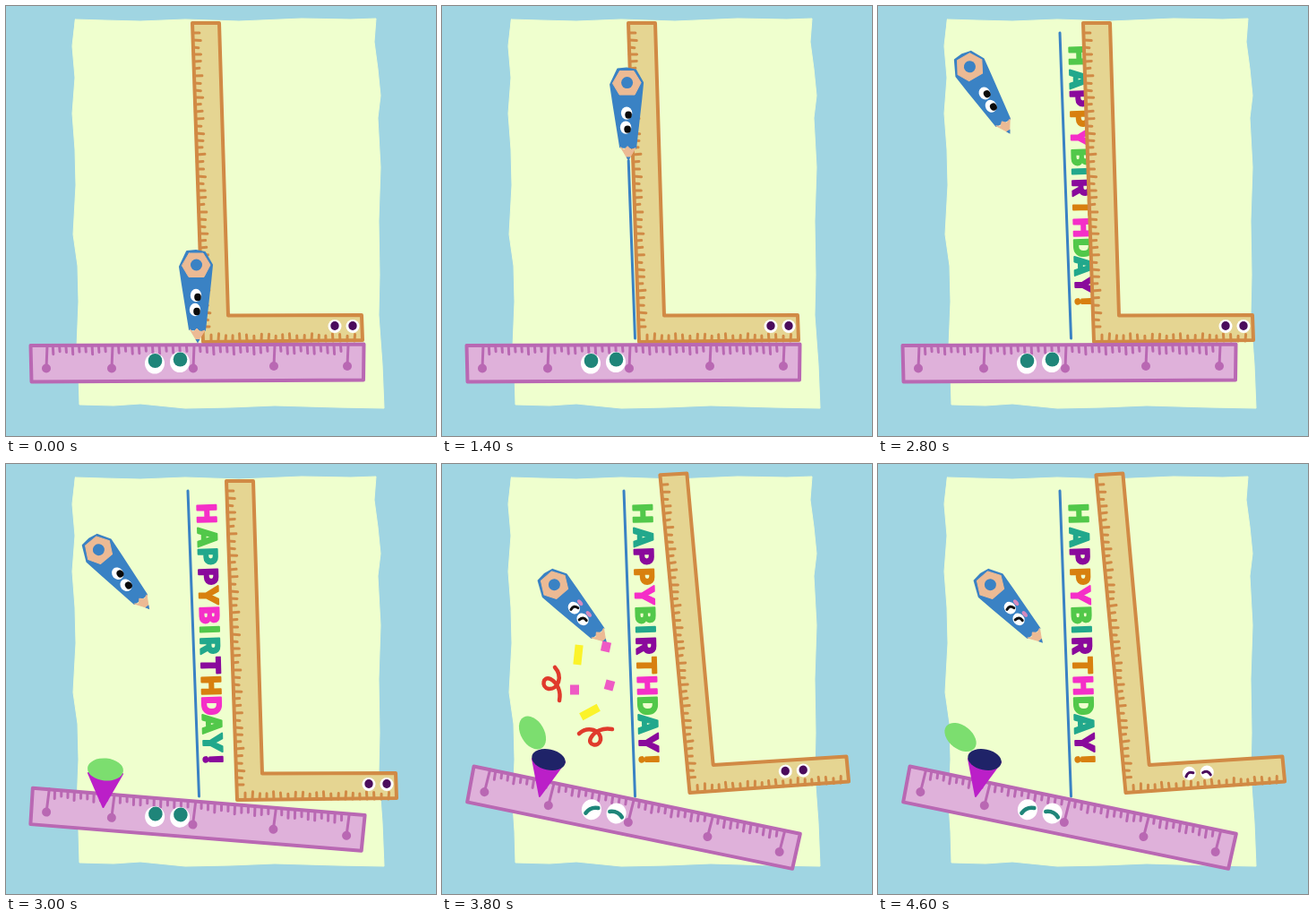
An HTML page with a canvas for the animation above (4.8 s loop, 480 by 480 pixels).

```html
<!DOCTYPE html>
<html lang="en">
<head>
<meta charset="utf-8">
<title>Happy Birthday</title>
<style>
html, body { margin: 0; width: 100%; height: 100%; overflow: hidden; background: #a0d5e2; }
canvas { display: block; width: 480px; height: 480px; }
</style>
</head>
<body>
<canvas id="stage" width="480" height="480"></canvas>
<script>
const ctx = document.getElementById('stage').getContext('2d');
const STEP = 200, STEPS = 24;
const BLUE = '#3a82c4', PEACH = '#ecba94', PURPLE = '#4b0c5c', TEAL = '#1f8579';
const INKS = ['#f52fc8', '#52c84a', '#22a88c', '#8a0a9c', '#d8800f'];

// Keys are [step, ...values]; values are linear in between.
function track(keys, n) {
  if (n <= keys[0][0]) return keys[0].slice(1);
  for (let i = 1; i < keys.length; i++) {
    const a = keys[i - 1], b = keys[i];
    if (n <= b[0]) {
      const k = (n - a[0]) / (b[0] - a[0]);
      return a.slice(1).map((v, j) => v + (b[j + 1] - v) * k);
    }
  }
  return keys[keys.length - 1].slice(1);
}

const PENCIL_LIFT = [[0, 0], [1, -18], [2, -42], [3, -72], [4, -104.5], [5, -132], [6, -169], [11, -341], [12, -370]];
const PENCIL_FLY = [[13, 112, -35, -15], [14, 102, 68, -30], [15, 103, 96, -39.5], [17, 130, 117, -22.5], [19, 125, 135, -41]];
const SQUARE = [[12, 220, 375, 0], [13, 228, 375, 0], [14, 241, 375, 0], [15, 258, 375, 0],
  [16, 261, 368, 0], [17, 268, 360.5, -0.3], [18, 276, 363, -2.4], [19, 276.5, 367, -3.4]];
const SQUARE_EYES = [[17, 0], [19, -39], [22, -75]];
const RULER = [[14, 398.5, 0], [15, 397, 4.9], [16, 395, 11.9]];
const LID = [[17, 101, 299, 70], [19, 101, 300, 60], [21, 92, 305, 38]];
const DRIFT = [[19, 0, 0], [20, 12, 12], [21, 20, 38], [22, 28, 70]];
// kind, then x, y, angle at the burst and 400 ms later
const CONFETTI = [
  ['strip', 98, 232, -15, 152, 213, 6],
  ['strip', 135, 288, 42, 165, 277, 62],
  ['bit', 124, 212, 35, 183, 204, 12],
  ['bit', 143.5, 251, 35, 187, 247, 15],
  ['bit', 110, 270, 20, 148, 252, 0],
  ['curl', 88, 271, 64, 126, 245, 90],
  ['curl', 147, 306, -15, 171, 301, 0]
];
const LETTERS = 'HAPPYBIRTHDAY!';
const SPOTS = [55.5, 82, 103.5, 126, 147, 169, 185, 203, 225, 247.5, 270, 290.5, 311.5, 330];

function at(x, y, deg, draw) {
  ctx.save();
  ctx.translate(x, y);
  ctx.rotate(deg * Math.PI / 180);
  draw();
  ctx.restore();
}

function poly(pts, fill, line, width) {
  ctx.beginPath();
  pts.forEach(([x, y]) => ctx.lineTo(x, y));
  ctx.closePath();
  if (fill) { ctx.fillStyle = fill; ctx.fill(); }
  if (line) { ctx.strokeStyle = line; ctx.lineWidth = width; ctx.stroke(); }
}

function oval(x, y, rx, ry, fill, deg = 0) {
  ctx.beginPath();
  ctx.ellipse(x, y, rx, ry, deg * Math.PI / 180, 0, Math.PI * 2);
  ctx.fillStyle = fill;
  ctx.fill();
}

function seg(x1, y1, x2, y2, color, width) {
  ctx.beginPath();
  ctx.moveTo(x1, y1);
  ctx.lineTo(x2, y2);
  ctx.strokeStyle = color;
  ctx.lineWidth = width;
  ctx.stroke();
}

function wink(x, y, r, color, deg, width) {
  at(x, y, deg, () => {
    ctx.beginPath();
    ctx.moveTo(-r, 1.5);
    ctx.quadraticCurveTo(0, -3.5, r, 1);
    ctx.strokeStyle = color;
    ctx.lineWidth = width;
    ctx.stroke();
  });
}

function paper() {
  const pts = [[77, 15], [110, 16], [150, 17], [200, 15], [260, 17], [330, 14], [385, 15], [413, 14],
    [411, 40], [415, 70], [418, 100], [415, 125], [418, 180], [416, 240], [417, 300], [416, 345],
    [420, 400], [422, 449], [370, 448], [300, 446], [250, 448], [200, 449], [150, 444], [120, 446], [82, 445],
    [81, 410], [79, 380], [81, 330], [80, 290], [75, 255], [78, 200], [77, 160], [74, 120], [77, 80], [74, 45]];
  poly(pts, '#efffce', '#efffce', 1);
}

function line(tipY) {
  const y = Math.max(30, tipY);
  if (y < 372) seg(215.5, 371, 203 + (y - 30) * 0.0365, y, BLUE, 3);
}

function greeting(n) {
  const shift = n === 23 ? 1 : (30 - n) % 5;
  ctx.font = '800 29px Inter, "Open Sans", sans-serif';
  ctx.textAlign = 'center';
  [...LETTERS].forEach((ch, i) => {
    const y = SPOTS[i];
    at(213.5 + (y - 55) * 0.026, y, 88.5, () => {
      ctx.fillStyle = ctx.strokeStyle = INKS[(i + shift) % 5];
      ctx.lineWidth = 2;
      ctx.fillText(ch, 0, 0);
      ctx.strokeText(ch, 0, 0);
    });
  });
}

function setSquare(n) {
  const [x, y, deg] = track(SQUARE, n), [slide] = track(SQUARE_EYES, n);
  const edge = '#d18a45';
  at(x, y, deg, () => {
    poly([[-12, -356], [18, -356], [28, -29.5], [177, -30], [178, -2], [0, 0]], '#e5d592', edge, 4);
    for (let i = 0; i < 42; i++) {
      const ty = -345 + i * 8, tx = ty * 12 / 356;
      seg(tx, ty, tx + 7.5 + Math.sin(i * 2.3) * 1.5, ty + Math.sin(i) * 0.7, edge, 3);
    }
    for (let i = 0; i < 21; i++) {
      const tx = 9 + i * 8;
      seg(tx, -1, tx + Math.sin(i) * 0.6, -8 - Math.sin(i * 1.9) * 1.3, edge, 3);
    }
    [147, 167].forEach((ex, i) => {
      ex += slide;
      oval(ex, -17.5, 7.5, 7.5, '#fff');
      if (n > 20) wink(ex, -17, 4.5, PURPLE, i ? 22 : -22, 3);
      else oval(ex, -18, 4.7, 5, PURPLE);
    });
  });
}

function ruler(n) {
  const [y, deg] = track(RULER, n), edge = '#b968b3';
  at(213.5, y, deg, () => {
    poly([[-186, -19.5], [186, -21], [185.5, 19], [-185, 21]], '#dfb1da', edge, 4);
    const marks = [-168.5, -95.5, -4.5, 85.5, 167.5];
    marks.forEach((mx, i) => {
      const low = i < 3 ? 6 : 3.5;
      seg(mx + 1, -20, mx, low, edge, 3);
      oval(mx, low, 5, 5, edge);
      const next = marks[i + 1];
      if (next === undefined) return;
      const count = Math.round((next - mx) / 7.6);
      for (let k = 1; k < count; k++) {
        const tx = mx + (next - mx) * k / count;
        seg(tx, -19, tx + 0.5, -11.5 + Math.sin(k * 2 + i) * 1.8, edge, 3);
      }
    });
    [-47.5, -19.5].forEach((ex, i) => {
      const ey = i ? -1 : 0.5;
      oval(ex, ey, 11, 11.5, '#fff');
      if (n > 16) wink(ex, ey, 7.5, TEAL, i ? 15 : -32, 4.5);
      else oval(ex + 0.5, ey - 3, 7.8, 8, TEAL);
    });
  });
}

function pencil(n) {
  let [x, y, deg] = track(PENCIL_FLY, n);
  if (n < 13) {
    const [lift] = track(PENCIL_LIFT, n);
    x = 212 + lift * 0.029;
    y = 289 + lift;
    deg = 0;
  }
  at(x, y, deg, () => {
    poly([[-10, -15], [0, -16], [10, -14], [18, 0], [16, 20], [10, 73], [-7, 72], [-15, 22], [-18, 2]], BLUE, BLUE, 2);
    poly([[-7, 72], [-3, 75], [1, 71], [5, 75], [10, 73], [2, 86]], PEACH, PEACH, 1);
    poly([[-0.5, 83], [4.5, 83], [2, 87.5]], BLUE);
    poly([[-8, -13], [8, -13], [16, 0], [9, 13.5], [-8, 13.5], [-15.5, 1]], PEACH, PEACH, 1);
    oval(0.5, 0, 6.5, 6.5, BLUE);
    const shy = n > 17;
    [34, 50].forEach((ey, i) => {
      const ex = -i;
      oval(ex, ey, 6.2, 7.2, '#fff');
      if (shy) {
        wink(ex + 0.5, ey, 4, '#111', 32 + i * 18, 3);
        oval(ex + 9, ey, 2.2, 4, '#d58abd');
      } else {
        oval(ex + 2, ey + 2, 3.8, 4.2, '#0b0b0b');
      }
    });
    if (n === 17) oval(10, 33, 2, 3, '#d58abd');
  });
}

function popper(n) {
  if (n < 15) return;
  if (n === 15) {
    poly([[92, 345], [130, 346], [108.5, 383]], '#bb1fc8', '#bb1fc8', 2);
    oval(111, 341, 20, 12.5, '#7cde6f', 5);
    return;
  }
  poly([[101, 329], [137, 333], [109, 371]], '#bb1fc8', '#bb1fc8', 2);
  if (n === 16) {
    oval(119, 328, 20, 12.5, '#7cde6f', 12);
    return;
  }
  oval(119, 330, 19, 11.5, '#1f2368', 12);
  const [x, y, deg] = track(LID, n);
  oval(x, y, 20, 13, '#7cde6f', deg);
}

function confetti(n) {
  if (n < 17 || n > 22) return;
  const [dx, dy] = track(DRIFT, n), spin = Math.max(0, n - 19) * 12;
  CONFETTI.forEach(([kind, ...p], i) => {
    const [x, y, deg] = track([[17, ...p.slice(0, 3)], [19, ...p.slice(3)]], n);
    at(x + dx, y + dy, deg + spin, () => {
      if (kind === 'curl') {
        ctx.beginPath();
        ctx.moveTo(-18, 0);
        ctx.bezierCurveTo(-8, -9, 7, -4, 6, 7);
        ctx.bezierCurveTo(4, 16, -9, 13, -5, 5);
        ctx.bezierCurveTo(-1, -3, 9, -7, 19, -5);
        ctx.strokeStyle = '#e03a2c';
        ctx.lineWidth = 4.5;
        ctx.stroke();
      } else {
        const h = kind === 'bit' ? 11 : 22, w = kind === 'bit' ? 10 : 9;
        ctx.fillStyle = kind === 'bit' ? '#ee5ac4' : '#fbf32a';
        ctx.fillRect(-w / 2, -h / 2, w, h);
      }
    });
  });
}

function draw(n) {
  ctx.fillStyle = '#a0d5e2';
  ctx.fillRect(0, 0, 480, 480);
  paper();
  line(376 + track(PENCIL_LIFT, n)[0]);
  if (n > 12) greeting(n);
  setSquare(n);
  ruler(n);
  popper(n);
  pencil(n);
  confetti(n);
}

ctx.lineCap = ctx.lineJoin = 'round';
let shown = -1;
function tick() {
  const n = Math.floor(performance.now() / STEP) % STEPS;
  if (n !== shown) draw(shown = n);
  requestAnimationFrame(tick);
}
tick();
</script>
</body>
</html>
```
